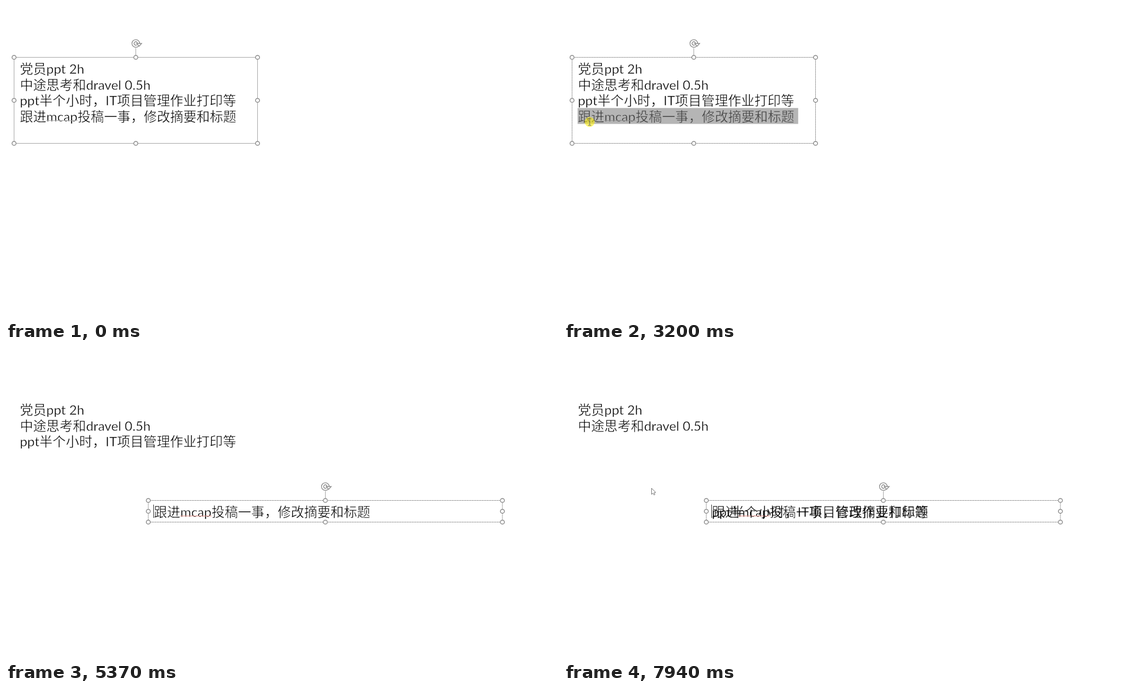
Write an HTML page with a canvas that moves like this. It is 993x564 px and loops after 8000 ms.

```html
<!DOCTYPE html>
<html lang="zh-CN">
<head>
<meta charset="utf-8">
<title>文本框拆分</title>
<style>
  html, body { margin: 0; width: 100%; height: 100%; overflow: hidden; background: #fff; }
  canvas { display: block; }
</style>
</head>
<body>
<canvas id="stage" width="993" height="564"></canvas>
<script>
const stage = document.getElementById('stage').getContext('2d');
let ctx = stage;
const LOOP = 8000;
const EM = 23.8, ROW = 28.7;
const LEFT = 25, TOP = 98;
const PASTE = { x: 266, y: 282 };
const CJK = '"Noto Sans CJK SC", "Noto Sans CJK", sans-serif';
const GRAY = '#8c8c8c', INK = '#444', BLUE = '#2b7cd3';

const lines = ['党员ppt 2h', '中途思考和dravel 0.5h', 'ppt半个小时，IT项目管理作业打印等', '跟进mcap投稿一事，修改摘要和标题'];

// Each move selects a row backwards, shows the toolbar, cuts the row and pastes it as a new box.
const moves = [
  { row: 3, press: 2080, menu: 3460, menuEnd: 3950, cut: 4560, paste: 4700, blur: 5440 },
  { row: 2, press: 6480, menu: 7120, menuEnd: 7460, cut: 7480, paste: 7700, blur: LOOP }
];

// Key points of the pointer: time, x, y.
const path = [
  [130, 929, 560], [880, 343, 218], [1690, 401, 199], [2080, 401, 202], [3200, 46, 209],
  [3440, 79, 210], [4210, 168, 265], [4420, 320, 325], [4500, 392, 361], [5440, 392, 361],
  [6120, 404, 158], [6480, 404, 166], [6860, 42, 171], [6920, 80, 167], [7460, 80, 167], [7940, 157.5, 254.5]
];

const within = (t, a, b) => t >= a && t < b;

function pointerAt(t) {
  const i = path.findIndex(p => p[0] > t);
  if (i < 1) return path.at(i).slice(1);
  const [t0, x0, y0] = path[i - 1], [t1, x1, y1] = path[i];
  const k = (t - t0) / (t1 - t0);
  return [x0 + (x1 - x0) * k, y0 + (y1 - y0) * k];
}

function stroke(color, width, ...points) {
  ctx.strokeStyle = color;
  ctx.lineWidth = width;
  ctx.beginPath();
  points.forEach(([x, y]) => ctx.lineTo(x, y));
  ctx.stroke();
}

function fillAndStroke(fill, border, width = 1) {
  ctx.fillStyle = fill;
  ctx.fill();
  ctx.shadowColor = 'transparent';
  ctx.strokeStyle = border;
  ctx.lineWidth = width;
  ctx.stroke();
}

function rect(color, x, y, w, h) {
  ctx.fillStyle = color;
  ctx.fillRect(x, y, w, h);
}

function rounded(x, y, w, h, r, fill, border) {
  ctx.beginPath();
  ctx.roundRect(x, y, w, h, r);
  fillAndStroke(fill, border);
}

function circle(x, y, r) {
  ctx.beginPath();
  ctx.arc(x, y, r, 0, Math.PI * 2);
}

// Text is rendered once per line, slightly eroded to get a light weight.
function lightText(line) {
  const sprite = document.createElement('canvas');
  sprite.width = 440;
  sprite.height = 36;
  const pen = sprite.getContext('2d');
  pen.lineWidth = .5;
  const marks = [];
  let x = 0;
  for (const run of line.match(/[\x20-\x7e]+|[^\x20-\x7e]+/g)) {
    const latin = run.charCodeAt(0) < 128;
    pen.font = latin ? `${EM}px Lato, sans-serif` : `${EM}px ${CJK}`;
    const width = pen.measureText(run).width;
    pen.globalCompositeOperation = 'source-over';
    pen.fillText(run, x, 24);
    pen.globalCompositeOperation = 'destination-out';
    pen.strokeText(run, x, 24);
    if (run === 'mcap') marks.push([x, width]);
    x += width;
  }
  return { sprite, marks, width: x };
}

const texts = lines.map(lightText);

function drawText(row, x, y, markColor) {
  const { sprite, marks } = texts[row];
  ctx.drawImage(sprite, x, Math.round(y));
  for (const [dx, w] of marks) rect(markColor, x + dx, Math.round(y) + 22, w, 1);
}

function rotateHandle(x, y) {
  for (const [color, width] of [[GRAY, 5.2], ['#fff', 2.6]]) {
    ctx.strokeStyle = color;
    ctx.lineWidth = width;
    ctx.beginPath();
    ctx.arc(x, y, 5, .75, Math.PI * 2);
    ctx.stroke();
  }
  ctx.beginPath();
  ctx.moveTo(x + 1.5, y);
  ctx.lineTo(x + 10.5, y);
  ctx.lineTo(x + 6, y + 5);
  ctx.closePath();
  fillAndStroke('#fff', GRAY, 1.3);
}

function textBox(x, y, w, h, dashed) {
  ctx.setLineDash(dashed ? [2, 1] : []);
  ctx.strokeStyle = dashed ? '#777' : '#a6a6a6';
  ctx.lineWidth = 1;
  ctx.strokeRect(x, y, w, h);
  ctx.setLineDash([]);
  stroke('#a6a6a6', 1, [x + w / 2, y - 17], [x + w / 2, y]);
  for (let i = 0; i < 9; i++) {
    if (i === 4) continue;
    circle(x + i % 3 * w / 2, y + Math.floor(i / 3) * h / 2, 3.6);
    fillAndStroke('#fff', GRAY, 1.5);
  }
  rotateHandle(x + w / 2, y - 25);
}

function label(text, x, y, size, style = '') {
  ctx.font = `${style} ${size}px "Open Sans", ${CJK}`;
  ctx.fillStyle = '#333';
  ctx.fillText(text, x, y);
}

function chevron(x, y, color = INK, size = 2.2) {
  stroke(color, 1, [x - 2.2, y - size / 2], [x, y + size / 2], [x + 2.2, y - size / 2]);
}

// Stacked bars; every second one is short. align: 0 left, .5 centre, 1 right.
function bars(x, y, w, short = w, align = 0, count = 4, color = INK) {
  for (let i = 0; i < count; i++) {
    const len = i % 2 ? short : w;
    rect(color, x + (w - len) * align, y + i * 3, len, 1);
  }
}

function fontControls() {
  rounded(47.5, 109.5, 74, 17, 2, '#fff', '#bdbdbd');
  rounded(123.5, 109.5, 36, 17, 2, '#fff', '#bdbdbd');
  label('18', 126, 122, 9.5);
  label('A', 164, 122, 13);
  label('A', 183.5, 122, 11);
  chevron(173.5, 114, BLUE, -2.5);
  chevron(192.5, 114, BLUE, 2.5);
  bars(201, 113, 11, 5, 1, 4, '#aaa');
  bars(219, 113, 11, 5, 1);
  stroke(BLUE, 1, [219, 117.5], [224, 117.5]);
}

function styleControls() {
  label('B', 52, 144, 9.5, 'bold');
  label('I', 71.5, 144, 10, 'italic');
  label('U', 88, 144, 9.5);
  rect(INK, 88, 146, 7, 1);
  rounded(102.5, 131.5, 16.5, 18, 3, '#ebebeb', '#777');
  [0, .5, 1].forEach((align, i) => bars(105 + i * 18.5, 136, 11, 7, align));
  stroke('#555', 2, [164, 142], [170, 135]);
  rect('#ffc000', 160, 144, 12, 3);
  label('A', 191.5, 143, 10.5);
  rect('#ff3300', 189, 144, 13, 3);
  stroke('#555', 2, [226, 139], [231, 135]);
  stroke('#e8a33d', 5, [220.5, 140], [226, 145]);
}

function paragraphControls() {
  stroke('#555', 1, [247, 112.5], [255.5, 112.5], [255.5, 122.5], [243.5, 122.5], [240.5, 126], [240.5, 118]);
  rect('#2f9e44', 238, 113, 8, 1);
  rect('#2f9e44', 241.5, 109.5, 1, 8);
  rect('#d0d0d0', 263, 107, 1, 46);
  for (let y = 111; y < 125; y += 6) {
    rect(BLUE, 281, y - 1, 3, 3);
    rect(INK, 287, y, 11, 1);
  }
  rect(BLUE, 320.5, 111, 1, 14);
  chevron(321, 112.5, BLUE, -2.5);
  chevron(321, 123.5, BLUE, 2.5);
  bars(326, 111, 10, 10, 0, 5);
  bars(355, 111, 17, 17, 0, 5);
  label('新建', 238, 137, 9.2);
  label('批注', 238, 149, 9.2);
  label('项目符号', 271, 138.5, 9.2);
  label('行距', 317, 137, 9.2);
  label('两端对齐', 345, 137, 9.2);
}

function toolbar(dy) {
  ctx.save();
  ctx.translate(0, dy);
  ctx.shadowColor = 'rgba(0,0,0,.3)';
  ctx.shadowBlur = 6;
  ctx.shadowOffsetY = 2;
  rounded(43.5, 104.5, 342, 50.5, 3, '#fff', '#c8c8c8');
  fontControls();
  styleControls();
  paragraphControls();
  for (const x of [116, 154, 339.5]) chevron(x, 118.5);
  for (const x of [180, 209]) chevron(x, 141);
  chevron(290.5, 147);
  ctx.restore();
}

function arrow(x, y) {
  ctx.beginPath();
  ctx.moveTo(x, y);
  ctx.lineTo(x, y + 11);
  ctx.lineTo(x + 2.6, y + 8.8);
  ctx.lineTo(x + 4.4, y + 12.2);
  ctx.lineTo(x + 6, y + 11.4);
  ctx.lineTo(x + 4.6, y + 8);
  ctx.lineTo(x + 7.5, y + 7.6);
  ctx.closePath();
  fillAndStroke('#fff', '#777');
}

function beam(x, y) {
  stroke('#666', 1, [x, y - 6], [x, y + 6]);
  for (const end of [y - 6, y + 6]) stroke('#666', 1, [x - 3, end], [x + 3, end]);
}

function pointer(t) {
  const [first, second] = moves;
  const hidden = t < 130 || within(t, 1780, first.press) ||
    within(t, first.cut, 5400) || within(t, second.menuEnd, 7940);
  if (hidden) return;
  const [x, y] = pointerAt(t);
  if (t < 6250) {
    circle(x, y, 9);
    ctx.fillStyle = 'rgba(255,240,0,.55)';
    ctx.fill();
  }
  const selected = within(t, 3400, first.cut) || t > 6900;
  if (x < 453 && y < 240 && !selected) return beam(x, y);
  arrow(x, y);
  if (within(t, 4210, first.cut)) rounded(x + 3.5, y + 10.5, 6, 6, 1, '#fff', '#555');
}

// The selection grows leftwards from the line end, cell by cell.
function selection({ row }, t) {
  const cells = Math.floor((pointerAt(t)[0] - LEFT) / EM);
  const dragging = t < moves[0].press + 1000 || within(t, 6480, 6850);
  const left = LEFT - .5 + (dragging ? Math.max(0, cells) * EM : 0);
  const right = LEFT + texts[row].width + 7;
  rect('rgba(114,114,114,.525)', left, TOP + row * ROW - .3, right - left, ROW);
}

function draw(t) {
  rect('#fff', 0, 0, 993, 564);

  const left = lines.length - moves.filter(m => t >= m.cut).length;
  for (let row = 0; row < left; row++) {
    drawText(row, LEFT, TOP + row * ROW, '#b5b5b5');
  }

  for (const move of moves) {
    if (t >= move.paste) drawText(move.row, PASTE.x, PASTE.y - .5, '#f29a92');
    if (within(t, move.press, move.cut)) selection(move, t);
  }

  if (t < moves[0].paste || within(t, moves[1].press, moves[1].cut + 140)) {
    textBox(14.5, 92.5, 438, Math.round(40 + left * ROW), t >= moves[0].press);
  }

  for (const move of moves) {
    if (within(t, move.paste, move.blur)) {
      textBox(256, 276.5, 637, 39, true);
      rect('#333', 265, 284, 1, 24);
    }
    if (within(t, move.menu, move.menuEnd)) toolbar(move.row === 3 ? 42 : 0);
  }
  pointer(t);
}

function tick() {
  draw(performance.now() % LOOP);
  requestAnimationFrame(tick);
}
tick();
</script>
</body>
</html>
```
